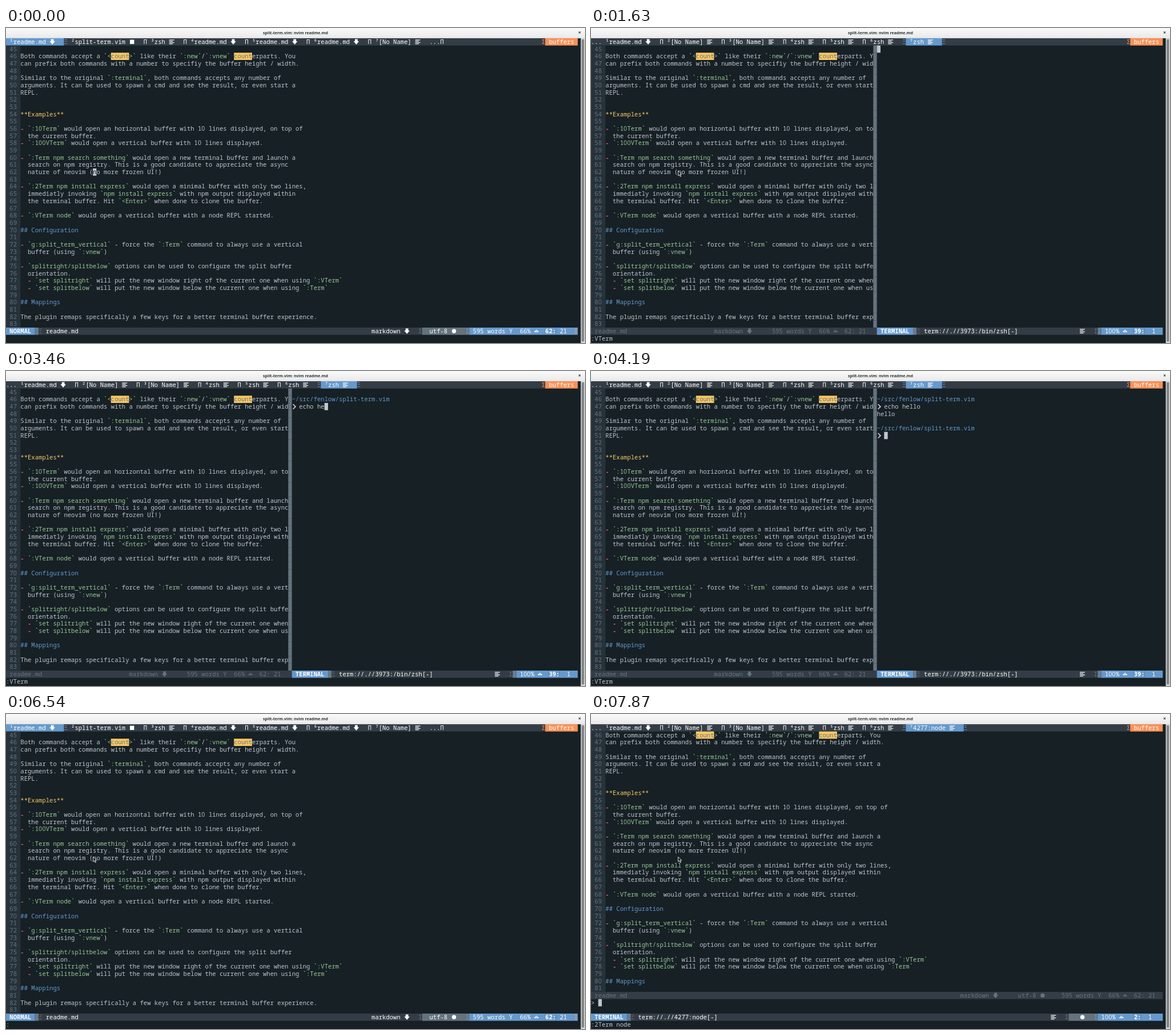
Recreate the animation shown at these times as an HTML page with a canvas. Size 1014 px wide and 552 px high, loop 8 s.

```html
<!DOCTYPE html>
<html lang="en">
<head>
<meta charset="utf-8">
<title>Split terminal demo</title>
<style>
html, body { margin: 0; width: 100%; height: 100%; overflow: hidden; background: #162025; }
canvas { display: block; width: 100vw; height: 100vh; }
</style>
</head>
<body>
<canvas id="stage" width="1014" height="552"></canvas>
<script>
const ctx = document.getElementById('stage').getContext('2d');
const LOOP = 8000;
// The screen is laid out at 1920 units wide, with cells of 12 by 24.
const SCALE = 1014 / 1920, CELL_W = 12, CELL_H = 24, TOP = 34, COLS = 158;
const BG = '#162025', GUTTER = '#27323a', BAR = '#343d46', GREY = '#65737e';
const TEXT = '#c0c5ce', WHITE = '#ffffff', BLUE = '#6699cc', GREEN = '#99c794';
const YELLOW = '#fac863', ORANGE = '#f99157', RED = '#ec5f67', LILAC = '#d0b8d4';

const FIRST_LINE = 45;
const README = `
Both commands accept a \`<count>\` like their \`:new\`/\`:vnew\` counterparts. You
can prefix both commands with a number to specifiy the buffer height / width.

Similar to the original \`:terminal\`, both commands accepts any number of
arguments. It can be used to spawn a cmd and see the result, or even start a
REPL.


**Examples**

- \`:10Term\` would open an horizontal buffer with 10 lines displayed, on top of
  the current buffer.
- \`:100VTerm\` would open a vertical buffer with 10 lines displayed.

- \`:Term npm search something\` would open a new terminal buffer and launch a
  search on npm registry. This is a good candidate to appreciate the async
  nature of neovim (no more frozen UI!)

- \`:2Term npm install express\` would open a minimal buffer with only two lines,
  immediatly invoking \`npm install express\` with npm output displayed within
  the terminal buffer. Hit \`<Enter>\` when done to clone the buffer.

- \`:VTerm node\` would open a vertical buffer with a node REPL started.

## Configuration

- \`g:split_term_vertical\` - force the \`:Term\` command to always use a vertical
  buffer (using \`:vnew\`)

- \`splitright/splitbelow\` options can be used to configure the split buffer
  orientation.
  - \`set splitright\` will put the new window right of the current one when using \`:VTerm\`
  - \`set splitbelow\` will put the new window below the current one when using \`:Term\`

## Mappings

The plugin remaps specifically a few keys for a better terminal buffer experience.
`.split('\n');

const SHELL_PATH = '~/src/fenlow/split-term.vim';
const COMMAND = 'echo hello';
const KEY_TIMES = [2710, 2980, 3076, 3172, 3268, 3364, 3460, 3590, 3730, 3890];
const afterRun = ['', SHELL_PATH, '❯ ' + COMMAND, 'hello', '', SHELL_PATH, '❯'];

// Each step changes part of the state and holds until the next one.
const STEPS = [
  [0, { view: 'full', cmd: '', cursor: [24, 18, 'n'], mouse: false }],
  [320, { cursor: null }],
  [470, { cmd: ':', cursor: [1, 41], mouse: true }],
  [710, { cmd: ':V', cursor: [2, 41] }],
  [750, { mouse: false }],
  [1060, { cmd: ':VTerm', cursor: [6, 41] }],
  [1450, { view: 'vertical', mode: 'TERMINAL', shell: [], cursor: [79, 1], mouse: true }],
  [2510, { shell: ['', SHELL_PATH, '❯'], cursor: [81, 3] }],
  ...KEY_TIMES.map((time, i) => [time, {
    shell: ['', SHELL_PATH, '❯ ' + COMMAND.slice(0, i + 1)], cursor: [82 + i, 3]
  }]),
  [2820, { mouse: false }],
  [4190, { shell: afterRun, cursor: [81, 7] }],
  [4790, { shell: [...afterRun, '', '[Process exited 0]'], cursor: [97, 9] }],
  [5220, { mode: 'NORMAL', cmd: '', mouse: true }],
  [5330, { view: 'full', cursor: [24, 18, 'n'] }],
  [5720, { cmd: ':', cursor: [1, 41] }],
  [6540, { cursor: null }],
  [6640, { cursor: [1, 41] }],
  [6850, { cmd: ':2', cursor: [2, 41] }],
  [6900, { mouse: false }],
  [7170, { cmd: ':2Term node', cursor: [11, 41] }],
  [7630, { view: 'horizontal', shell: [], cursor: [0, 38], mouse: true }],
  [7870, { shell: ['>'], cursor: [2, 38] }]
].sort((a, b) => a[0] - b[0]);

function polygon(x, y, points) {
  ctx.beginPath();
  points.forEach(([px, py]) => ctx.lineTo(x + px, y + py));
  ctx.closePath();
}

// Symbols drawn as shapes; x and y are the top left corner of the cell.
const ICONS = {
  '↓': (x, y) => {
    polygon(x + 9.6, y, [[-4.5, 3], [4.5, 3], [4.5, 10], [9, 10], [0, 21], [-9, 10], [-4.5, 10]]);
    ctx.fill();
  },
  '≡': (x, y) => [17, 12, 17, 12].forEach((w, i) => ctx.fillRect(x + 1, y + 4.5 + i * 4.3, w, 2.2)),
  '■': (x, y) => ctx.fillRect(x + 3, y + 5, 14, 14),
  '●': (x, y) => {
    ctx.beginPath();
    ctx.arc(x + 9.6, y + 12, 7, 0, 7);
    ctx.fill();
  },
  '△': (x, y) => {
    polygon(x + 7, y, [[-6, 14], [0, 8], [6, 14]]);
    ctx.lineWidth = 2;
    ctx.stroke();
  },
  '❯': (x, y) => {
    polygon(x, y, [[2, 4], [6, 4], [14, 12.5], [6, 21], [2, 21], [9, 12.5]]);
    ctx.fill();
  }
};

function fillCells(col, row, count, color) {
  ctx.fillStyle = color;
  ctx.fillRect(col * CELL_W, TOP + row * CELL_H, count * CELL_W, CELL_H);
}

function put(col, row, text, color, back, bold) {
  if (back) fillCells(col, row, text.length, back);
  ctx.fillStyle = ctx.strokeStyle = color;
  ctx.textAlign = 'left';
  const style = bold ? 'bold 20px' : '20px';
  const y = TOP + row * CELL_H;
  [...text].forEach((char, i) => {
    const x = (col + i) * CELL_W;
    if (ICONS[char]) return ICONS[char](x, y);
    // Open Sans has a zero without a slash.
    const family = char === '0' ? '"Open Sans", sans-serif' : '"Noto Sans Mono", "DejaVu Sans Mono", monospace';
    ctx.font = `${style} ${family}`;
    ctx.fillText(char, x, y + 19);
  });
}

function drawWindow() {
  ctx.fillStyle = BG;
  ctx.fillRect(0, 0, 1920, 1046);
  const title = ctx.createLinearGradient(0, 0, 0, TOP);
  title.addColorStop(0, '#fafafa');
  title.addColorStop(1, '#e9e9e9');
  ctx.fillStyle = title;
  ctx.fillRect(0, 0, 1920, TOP);
  ctx.fillStyle = '#2e3436';
  ctx.textAlign = 'center';
  ctx.font = 'bold 13.35px "Noto Sans", sans-serif';
  ctx.fillText('split-term.vim: nvim readme.md', 960, 21);
  ctx.font = 'bold 17px "Noto Sans", sans-serif';
  ctx.fillText('×', 1902, 21);
  ctx.fillStyle = '#d6d8d8';
  ctx.fillRect(1906, TOP, 14, 1046 - TOP);
  ctx.fillStyle = '#7e8385';
  ctx.beginPath();
  ctx.roundRect(1909, TOP + 3, 8, 1004, 4);
  ctx.fill();
}

function drawTabs(left, active, right) {
  fillCells(0, 0, COLS, BAR);
  let col = 0;
  for (const [text, color, back] of [
    [left, WHITE], [left && 'Ξ', BLUE], [active, WHITE, BLUE], ['Ξ', BLUE], [right, WHITE]
  ]) {
    put(col, 0, text, color, back);
    col += text.length;
  }
  put(148, 0, 'Σ', ORANGE);
  put(149, 0, ' buffers ', WHITE, ORANGE);
}

function drawReadme(first, last, cols) {
  for (let n = first; n <= last; n++) {
    const row = n - first + 1;
    const line = README[n - FIRST_LINE].slice(0, cols - 4);
    const base = line.startsWith('##') ? BLUE : line.startsWith('**') ? YELLOW : TEXT;
    put(0, row, ` ${n} `, GREY, GUTTER);
    let col = 4;
    for (const part of line.split(/(^ *- |`[^`]*`)/)) {
      const bullet = col === 4 && /^ *- $/.test(part);
      put(col, row, part, bullet ? RED : part[0] === '`' ? GREEN : base, null, bullet);
      col += part.length;
    }
    for (const match of line.matchAll(/count/g)) put(4 + match.index, row, match[0], GREY, YELLOW);
  }
}

function drawMode(col, row, mode, name) {
  const end = col + mode.length + 2;
  put(col, row, ` ${mode} `, WHITE, BLUE, true);
  put(end, row, 'Ξ', BLUE, GREY);
  put(end + 1, row, 'Ξ', GREY, BAR);
  put(end + 3, row, name, WHITE);
}

function drawPosition(col, info, line, rest) {
  put(col, 40, info, WHITE, BLUE);
  col += info.length;
  put(col, 40, line, WHITE, BLUE, true);
  put(col + line.length, 40, rest, WHITE, BLUE);
}

const splitTabs = active => drawTabs(
  '... ¹readme.md ↓   Π ²[No Name] ≡   Π ³[No Name] ≡   Π ⁴zsh ≡   Π ⁵zsh ≡   Π ⁶zsh ≡   ', active, '');

const VIEWS = {
  full() {
    drawTabs('', ' ¹readme.md ↓   ', ' ²split-term.vim ■   Π ³zsh ≡   Π ⁴readme.md ↓   ' +
      'Π ⁵readme.md ↓   Π ⁶readme.md ↓   Π ⁷[No Name] ≡   ...Π');
    drawReadme(45, 83, COLS);
    fillCells(0, 40, COLS, BAR);
    drawMode(0, 40, 'NORMAL', 'readme.md');
    put(101, 40, 'markdown ↓', WHITE);
    put(114, 40, 'Σ', GREY);
    put(115, 40, '  utf-8 ●   ', WHITE, GREY);
    put(127, 40, 'Σ', BLUE, GREY);
    drawPosition(128, ' 595 words ϒ  66% △  ', '62:', ' 21  ');
    put(157, 40, 'Σ', ORANGE, BLUE);
  },
  vertical({ mode, shell }) {
    splitTabs(' ⁷zsh ≡   ');
    drawReadme(45, 83, 78);
    for (let row = 1; row < 40; row++) fillCells(78, row, 1, GREY);
    shell.forEach((line, i) => {
      put(79, i + 1, line, line === SHELL_PATH ? BLUE : TEXT);
      if (line[0] === '❯') put(79, i + 1, '❯', LILAC, BG);
    });
    fillCells(0, 40, COLS, BAR);
    put(1, 40, 'readme.md', GREY);
    put(34, 40, 'markdown ↓      595 words ϒ  66% △  62: 21', GREY);
    drawMode(79, 40, mode, 'term://.//3973:/bin/zsh[-]');
    put(135, 40, '≡', WHITE);
    put(139, 40, 'Σ', GREY);
    put(140, 40, 'Σ', BLUE, GREY);
    drawPosition(141, ' 100% △  ', '39:', '  1  ');
  },
  horizontal({ shell }) {
    splitTabs(' ⁷4277:node ≡   ');
    drawReadme(46, 81, COLS);
    fillCells(0, 37, COLS, BAR);
    put(1, 37, 'readme.md', GREY);
    put(102, 37, 'markdown ↓      utf-8 ●     595 words ϒ  66% △  62: 21', GREY);
    shell.forEach((line, i) => put(0, 38 + i, line, TEXT));
    fillCells(0, 40, COLS, BAR);
    drawMode(0, 40, 'TERMINAL', 'term://.//4277:node[-]');
    put(127, 40, '≡', WHITE);
    put(131, 40, 'Σ', GREY);
    put(132, 40, '   ●   ', WHITE, GREY);
    put(139, 40, 'Σ', BLUE, GREY);
    drawPosition(140, ' 100% △   ', '2:', '  1   ');
  }
};

function drawMouse() {
  polygon(289, 474, [[0, 0], [0, 16], [4, 12.5], [7, 19], [9.5, 18], [6.5, 11.5], [11.5, 11.5]]);
  ctx.fillStyle = '#111111';
  ctx.strokeStyle = WHITE;
  ctx.lineWidth = 1.6;
  ctx.fill();
  ctx.stroke();
}

function draw(state) {
  ctx.setTransform(SCALE, 0, 0, SCALE, 0, 0);
  drawWindow();
  VIEWS[state.view](state);
  put(0, 41, state.cmd, TEXT);
  if (state.cursor) {
    const [col, row, under = ' '] = state.cursor;
    put(col, row, under, BG, TEXT);
  }
  if (state.mouse) drawMouse();
}

let shown = 0;
function tick() {
  const time = performance.now() % LOOP;
  const passed = STEPS.filter(([start]) => start <= time);
  if (passed.length !== shown) {
    shown = passed.length;
    draw(Object.assign({}, ...passed.map(([, change]) => change)));
  }
  requestAnimationFrame(tick);
}
tick();
</script>
</body>
</html>
```
